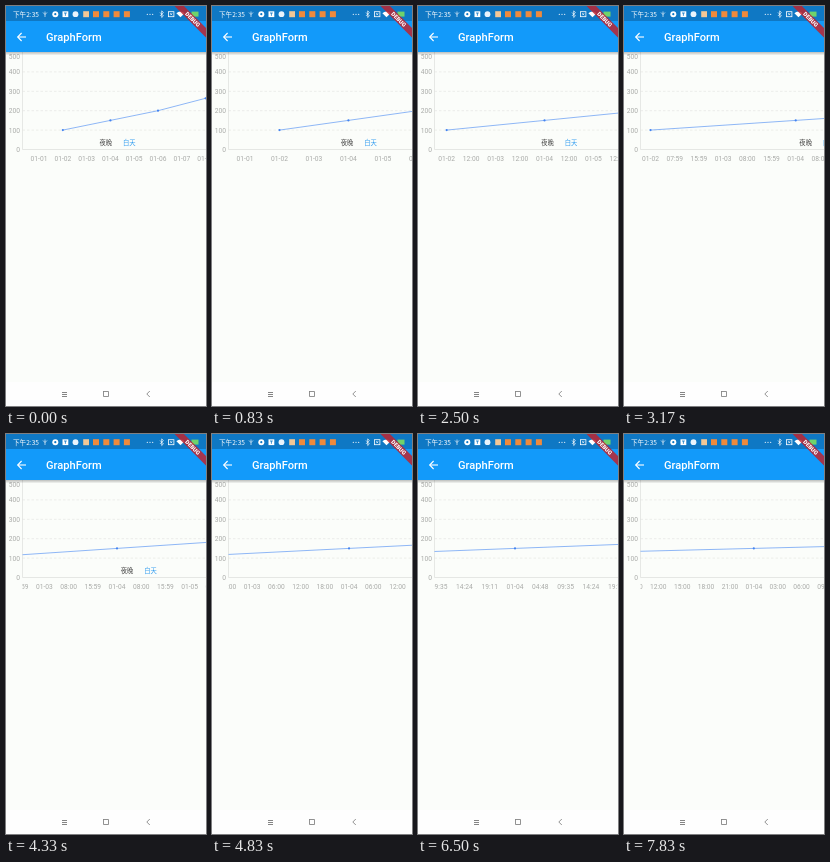
An HTML page with a canvas for the animation above (8000 ms loop, 200 px wide and 400 px high).

```html
<!DOCTYPE html>
<html lang="zh-CN">
<head>
<meta charset="utf-8">
<style>
  html, body { margin: 0; width: 100%; height: 100%; overflow: hidden; background: #fbfdfa; }
  canvas { display: block; width: 200px; height: 400px; }
</style>
</head>
<body>
<canvas id="stage"></canvas>
<script>
const W = 200, H = 400, STEPS = 48, STEP_MS = 1000 / 6;
const canvas = document.getElementById('stage');
const ctx = canvas.getContext('2d');
const ratio = window.devicePixelRatio || 1;
canvas.width = W * ratio;
canvas.height = H * ratio;

const LATIN = 'Roboto, sans-serif';
const CJK = '"Noto Sans CJK SC", "Noto Sans CJK", sans-serif';
const STATUS = '#0f78c4', LABEL = '#a9aba8';
const LEFT = 16.5, BASE = 143.5, ORIGIN = 33, UNIT = 0.194;
const POINTS = [[1, 100], [3, 150], [5, 200], [7, 264]];

// Pinch and drag gestures: [step, width of a day, scroll offset]
const GESTURES = [
  [0, 23.8, 0], [9, 43, 0], [10, 43, 0], [11, 43, 25.5], [13, 43, 46.8],
  [14, 43, 46.8], [19, 72.6, 79.1], [26, 72.6, 139.8], [31, 113, 217.6],
  [33, 113, 253.5], [36, 113, 282], [39, 126.5, 315.5], [45, 184, 459],
  [46, 184, 459], [47, 191, 476.2], [48, 191, 476.2]
];

const pad = n => String(n).padStart(2, '0');
const valueY = v => BASE - v * UNIT;

function viewAt(step) {
  const i = GESTURES.findIndex(g => g[0] > step);
  const a = GESTURES[i - 1], b = GESTURES[i];
  const k = (step - a[0]) / (b[0] - a[0]);
  const mix = n => a[n] + (b[n] - a[n]) * k;
  return { day: mix(1), scroll: mix(2) };
}

function rect(x, y, w, h, color) {
  ctx.fillStyle = color;
  ctx.fillRect(x, y, w, h);
}

function disc(x, y, r, color) {
  ctx.fillStyle = color;
  ctx.beginPath();
  ctx.arc(x, y, r, 0, Math.PI * 2);
  ctx.fill();
}

function path(points, color, width, dash = []) {
  ctx.strokeStyle = color;
  ctx.lineWidth = width;
  ctx.setLineDash(dash);
  ctx.beginPath();
  points.forEach(([x, y]) => ctx.lineTo(x, y));
  ctx.stroke();
  ctx.setLineDash([]);
}

function text(str, x, y, font, color, align = 'center') {
  ctx.font = font;
  ctx.fillStyle = color;
  ctx.textAlign = align;
  ctx.textBaseline = 'alphabetic';
  ctx.fillText(str, x, y);
}

function drawStatusBar() {
  rect(0, 0, W, 15, STATUS);
  text('下午2:35', 7, 10.6, '6.6px ' + CJK, '#fff', 'left');
  path([[39, 5.5], [39, 11]], '#d5e8f7', 0.8);
  path([[37, 6.5], [39, 8.5], [41, 6.5]], '#d5e8f7', 0.8);
  disc(49.3, 8.2, 3, '#fff');
  disc(49.3, 8.2, 1.1, STATUS);
  rect(56.5, 5.3, 5.8, 5.8, '#fff');
  path([[58, 7], [60.8, 7]], STATUS, 0.8);
  path([[59.4, 7], [59.4, 9.8]], STATUS, 0.8);
  disc(69.5, 8.2, 2.9, '#eaf4fc');
  rect(77.2, 5.2, 5.8, 6, '#f3c796');
  for (let i = 0; i < 4; i++) rect(87 + i * 10.3, 5.2, 6, 6, '#f08a3c');
  for (let i = 0; i < 3; i++) disc(141.3 + i * 2.7, 8.3, 0.6, '#fff');
  path([[154, 6.5], [157.4, 9.9], [155.7, 11.5], [155.7, 4.9], [157.4, 6.5], [154, 9.9]], '#fff', 0.7);
  ctx.lineWidth = 0.8;
  ctx.strokeRect(162.5, 5.7, 5.4, 5);
  path([[164.2, 7.2], [166.2, 9.2]], '#fff', 0.7);
  path([[166.2, 7.2], [164.2, 9.2]], '#fff', 0.7);
  ctx.fillStyle = '#fff';
  ctx.beginPath();
  ctx.moveTo(174.5, 11.3);
  ctx.arc(174.5, 11.3, 5.8, -Math.PI * 0.75, -Math.PI * 0.25);
  ctx.fill();
  rect(185.5, 5.6, 7, 5, '#6fd36b');
}

function drawAppBar() {
  const shadow = ctx.createLinearGradient(0, 46, 0, 49.5);
  shadow.addColorStop(0, 'rgba(0, 0, 0, 0.25)');
  shadow.addColorStop(1, 'rgba(0, 0, 0, 0)');
  rect(0, 46, W, 3.5, shadow);
  rect(0, 0, W, 46, '#129afa');
  drawStatusBar();
  path([[20, 31], [11.8, 31]], '#fff', 1.1);
  path([[15.6, 27], [11.7, 31], [15.6, 35]], '#fff', 1.1);
  text('GraphForm', 40, 35, '500 11.1px ' + LATIN, '#fff', 'left');
}

function drawBanner() {
  ctx.save();
  ctx.translate(W, 0);
  ctx.rotate(Math.PI / 4);
  rect(-22.2, 15.6, 44.4, 6.7, 'rgba(190, 36, 48, 0.85)');
  text('DEBUG', 0, 20.9, '900 5.7px ' + LATIN, '#fff');
  ctx.restore();
}

function drawNavBar() {
  rect(0, 376, W, 24, '#fefefe');
  for (let i = 0; i < 3; i++) rect(56, 386 + i * 2, 5, 1, '#858585');
  path([[97.5, 385.5], [102.5, 385.5], [102.5, 390.5], [97.5, 390.5], [97.5, 385]], '#777', 0.8);
  path([[143.8, 385], [140.8, 388], [143.8, 391]], '#777', 0.8);
}

function drawGrid() {
  for (let v = 0; v <= 500; v += 100) {
    const y = valueY(v);
    if (v > 0 && v < 500) path([[LEFT, y], [W, y]], '#dfe1de', 0.6, [2.5, 2]);
    text(v, 14, v === 500 ? 52.6 : y + 2.4, '6.67px ' + LATIN, LABEL, 'right');
  }
  path([[LEFT, 46], [LEFT, BASE], [W, BASE]], '#dddfdc', 0.7);
}

function timeLabel(day, part, parts) {
  if (part === 0) return '01-' + pad(day + 1);
  let minutes = 1440 * part / parts;
  // Thirds and fifths of a day are truncated to the minute before.
  if (parts % 2 && (part % 2 === 0 || day === 1)) minutes--;
  return pad(Math.floor(minutes / 60)) + ':' + pad(Math.floor(minutes % 60));
}

function drawChart({ day, scroll }) {
  const dayX = d => ORIGIN + d * day - scroll;
  const parts = Math.max(1, Math.floor(day / 23.8 + 0.001));
  drawGrid();
  ctx.save();
  ctx.beginPath();
  ctx.rect(LEFT, 46, W - LEFT, 115);
  ctx.clip();
  for (let d = 0; d < 9; d++) {
    for (let p = 0; p < parts; p++) {
      const x = dayX(d + p / parts);
      if (x > 0 && x < W + 12) text(timeLabel(d, p, parts), x, 154.6, '6.67px ' + LATIN, LABEL);
    }
  }
  const line = POINTS.map(([d, v]) => [dayX(d), valueY(v)]);
  path(line, '#6a9ff5', 0.75);
  line.forEach(([x, y]) => disc(x, y, 1.1, '#4484f0'));
  if (parts < 4) {
    const x = dayX(3.297) - 11.6;
    text('夜晚', x, 138.8, '6.3px ' + CJK, '#444');
    text('白天', x + 23.5, 138.8, '6.3px ' + CJK, '#2f9bf0');
  }
  ctx.restore();
}

function render(now) {
  const step = Math.floor((now + 4) / STEP_MS) % STEPS;
  ctx.setTransform(ratio, 0, 0, ratio, 0, 0);
  rect(0, 0, W, H, '#fbfdfa');
  drawChart(viewAt(step));
  drawAppBar();
  drawBanner();
  drawNavBar();
}

const start = performance.now();
function tick() {
  render(performance.now() - start);
  requestAnimationFrame(tick);
}
tick();
</script>
</body>
</html>
```
